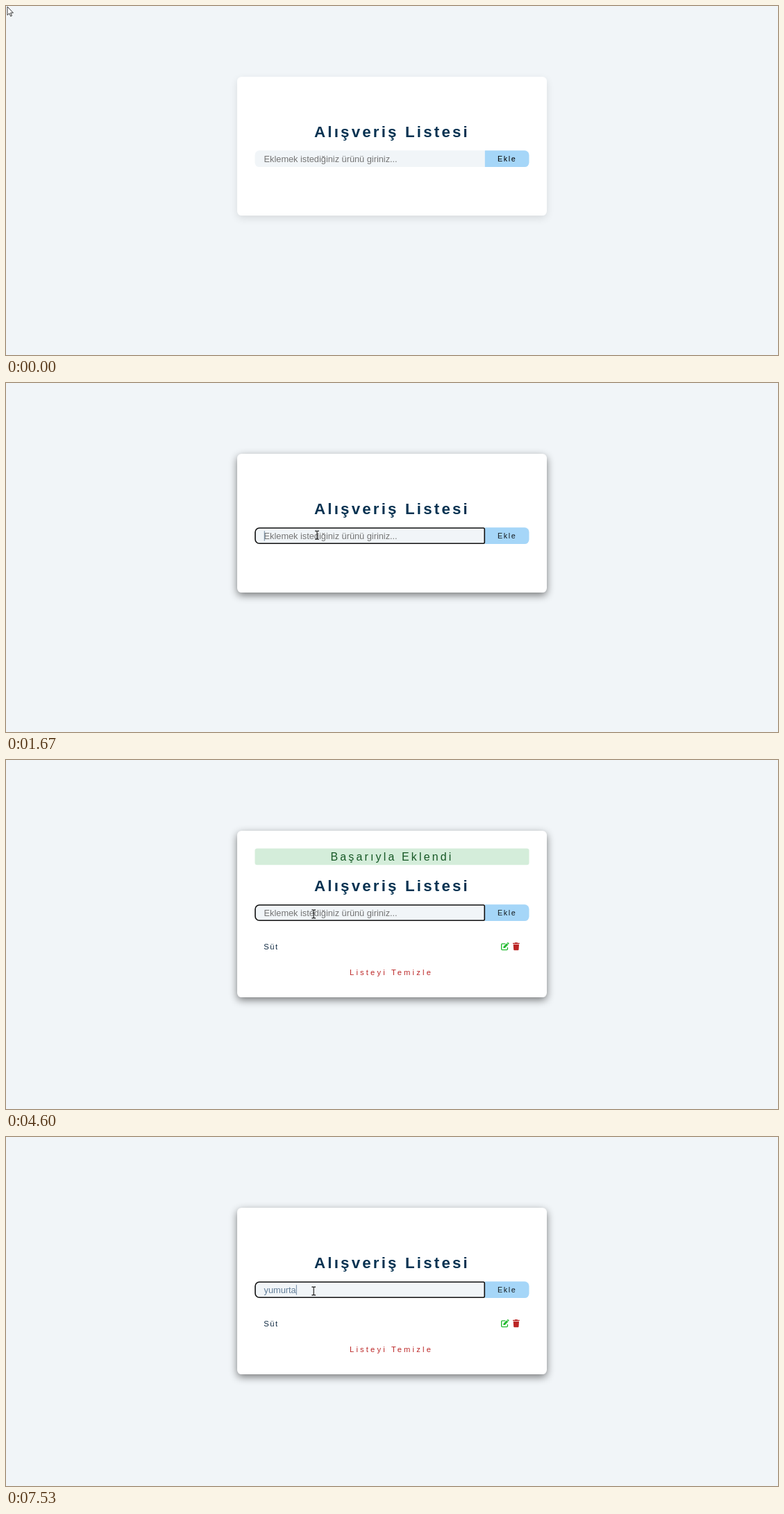
Animation of 1112x503 px, one loop 8000 ms. Source, as an HTML page:

```html
<!DOCTYPE html>
<html lang="tr">
<head>
<meta charset="utf-8">
<title>Alışveriş Listesi</title>
<style>
  html, body { margin: 0; width: 100%; height: 100%; overflow: hidden; background: #f1f5f8; }
  svg { display: block; width: 1112px; height: 503px; }
  text { font-family: "Liberation Sans", Arial, sans-serif; white-space: pre; }
  .field { font-size: 12.75px; }
  .small { font-size: 11.15px; }
  .wide { letter-spacing: 3.186px; }
  .tight { letter-spacing: 1.593px; }
</style>
</head>
<body>
<svg viewBox="0 0 1112 503">
  <defs>
    <filter id="blur" x="-20%" y="-30%" width="140%" height="160%">
      <feGaussianBlur stdDeviation="6"/>
    </filter>
  </defs>
  <rect width="1112" height="503" fill="#f1f5f8"/>

  <rect id="shadow" x="333" y="106" width="446" height="200" rx="6.4" filter="url(#blur)"/>
  <rect id="card" x="333" y="102" width="446" height="200" rx="6.4" fill="#fff"/>

  <g id="alert">
    <rect x="358.5" y="127.4" width="395" height="23.8" rx="3.2" fill="#d4edda"/>
    <text class="wide" x="467.4" y="144.8" font-size="15.93" fill="#155724">Başarıyla Eklendi</text>
  </g>

  <text class="wide" x="444" y="189.4" font-size="22.3" font-weight="700" fill="#063251">Alışveriş Listesi</text>

  <path d="M689.8 208.3V232H364.9a6.4 6.4 0 0 1-6.4-6.4V214.7a6.4 6.4 0 0 1 6.4-6.4z" fill="#f1f5f8"/>
  <path d="M689.8 208.3H747.1a6.4 6.4 0 0 1 6.4 6.4V225.6a6.4 6.4 0 0 1-6.4 6.4H689.8z" fill="#a5d6f8"/>
  <text id="button" class="tight" x="708" y="224" font-size="10.8">Ekle</text>
  <text id="hint" class="field" x="371.6" y="224.6" fill="#757575">Eklemek istediğiniz ürünü giriniz...</text>
  <text id="typed" class="field" x="371.6" y="224.6" fill="#617d98"></text>
  <rect id="caret" y="213.2" width="0.9" height="14.4" fill="#617d98"/>
  <path id="focus" d="M687.6 209H365a6 6 0 0 0-6 6v10.3a6 6 0 0 0 6 6H687.6a1.7 1.7 0 0 0 1.7-1.7V210.7a1.7 1.7 0 0 0-1.7-1.7z"
        fill="none" stroke="#101010" stroke-width="1.6"/>

  <g id="list">
    <text class="small tight" x="371.3" y="272.8" fill="#102a42">Süt</text>
    <g fill="#25bb32">
      <path d="M719.4 264.9H714.7a1 1 0 0 0-1 1v6.7a1 1 0 0 0 1 1h6.7a1 1 0 0 0 1-1V270" fill="none" stroke="#25bb32" stroke-width="1.4"/>
      <path d="M716.3 271.1l.3-2.3 4.6-4.6 2.1 2.1-4.6 4.6zM721.7 263.7l.5-.5a1 1 0 0 1 1.4 0l.7.7a1 1 0 0 1 0 1.4l-.5.5z"/>
    </g>
    <path d="M730 263.7h2.7l.4-.7h3.5l.4.7h2.7v1.4H730zM730.7 265.8h8.3l-.5 7.4a1 1 0 0 1-1 1h-5.3a1 1 0 0 1-1-1z" fill="#bb2525"/>
    <text class="small wide" x="495" y="310" fill="#bb2525">Listeyi Temizle</text>
  </g>

  <path id="arrow" d="M0 0V12.2L2.8 9.6 4.7 13.8 6.5 13 4.6 8.9H8.4z" fill="#fff" stroke="#222" stroke-width="0.9"/>
  <path id="beam" d="M-2.8-5.9H-.9L0-5.2.9-5.9H2.8M0-5.2V5.2M-2.8 5.9H-.9L0 5.2.9 5.9H2.8" fill="none" stroke="#111" stroke-width="1.1"/>
</svg>
<script>
const LOOP = 8000, STEP = 200 / 3, BLINK = 530;
const FOCUS = 1670, SUBMIT = 4600, ALERT_END = 6600;
const el = id => document.getElementById(id);
const show = (id, on) => el(id).setAttribute('visibility', on ? 'visible' : 'hidden');
const clamp = v => Math.max(0, Math.min(1, v));
const mix = (a, b, p) => a + (b - a) * p;

const words = [
  { text: 'süt', times: [2800, 3130, 3730], end: SUBMIT },
  { text: 'yumurta', times: [5800, 6000, 6330, 6600, 6930, 7130, 7530], end: LOOP }
];

// Pointer positions advance on a 15 Hz grid.
const stepped = (t, start, count) =>
  clamp((Math.floor((t - start + 5) / STEP) + 1) / count);

function pointer(t) {
  if (t < 1065) {
    const p = stepped(t, 200, 13), s = p * p * (3 - 2 * p);
    return [mix(2, 462, s), mix(1, 222.3, s)];
  }
  if (t < 1865) {
    const p = stepped(t, 1070, 6), q = 1 - p;
    const curve = (a, b, c) => q * q * a + 2 * q * p * b + p * p * c;
    return [curve(462, 457, 448), curve(222.3, 241.5, 219.3)];
  }
  const p = stepped(t, 1870, 2);
  return [mix(448, 443.2, p), mix(219.3, 222, p)];
}

function typedText(t) {
  const word = words.find(w => t >= w.times[0] && t < w.end);
  return word ? word.text.slice(0, word.times.filter(k => k <= t).length) : '';
}

function render(t) {
  const added = t >= SUBMIT, focused = t >= FOCUS;
  const height = added ? 240 : 200;
  el('card').setAttribute('height', height);
  el('shadow').setAttribute('height', height);
  el('shadow').setAttribute('opacity', mix(0.1, 0.5, clamp((t - 700) / 300)));
  show('list', added);
  show('alert', added && t < ALERT_END);

  const text = typedText(t);
  el('typed').textContent = text;
  show('hint', !text);
  show('focus', focused);
  el('button').setAttribute('fill-opacity', focused ? 0.88 : 1);

  // Each key press restarts the caret blink.
  const lastKey = Math.max(FOCUS, ...words.flatMap(w => w.times).filter(k => k <= t));
  show('caret', focused && Math.floor((t - lastKey) / BLINK) % 2 === 0);
  el('caret').setAttribute('x', 371.8 + (text ? el('typed').getComputedTextLength() : 0));

  const [x, y] = pointer(t), overField = x > 358 && y > 208;
  show('arrow', !overField);
  show('beam', overField);
  for (const id of ['arrow', 'beam']) el(id).setAttribute('transform', `translate(${x} ${y})`);
}

const start = performance.now();
function tick() {
  render((performance.now() - start) % LOOP);
  requestAnimationFrame(tick);
}
tick();
</script>
</body>
</html>
```
